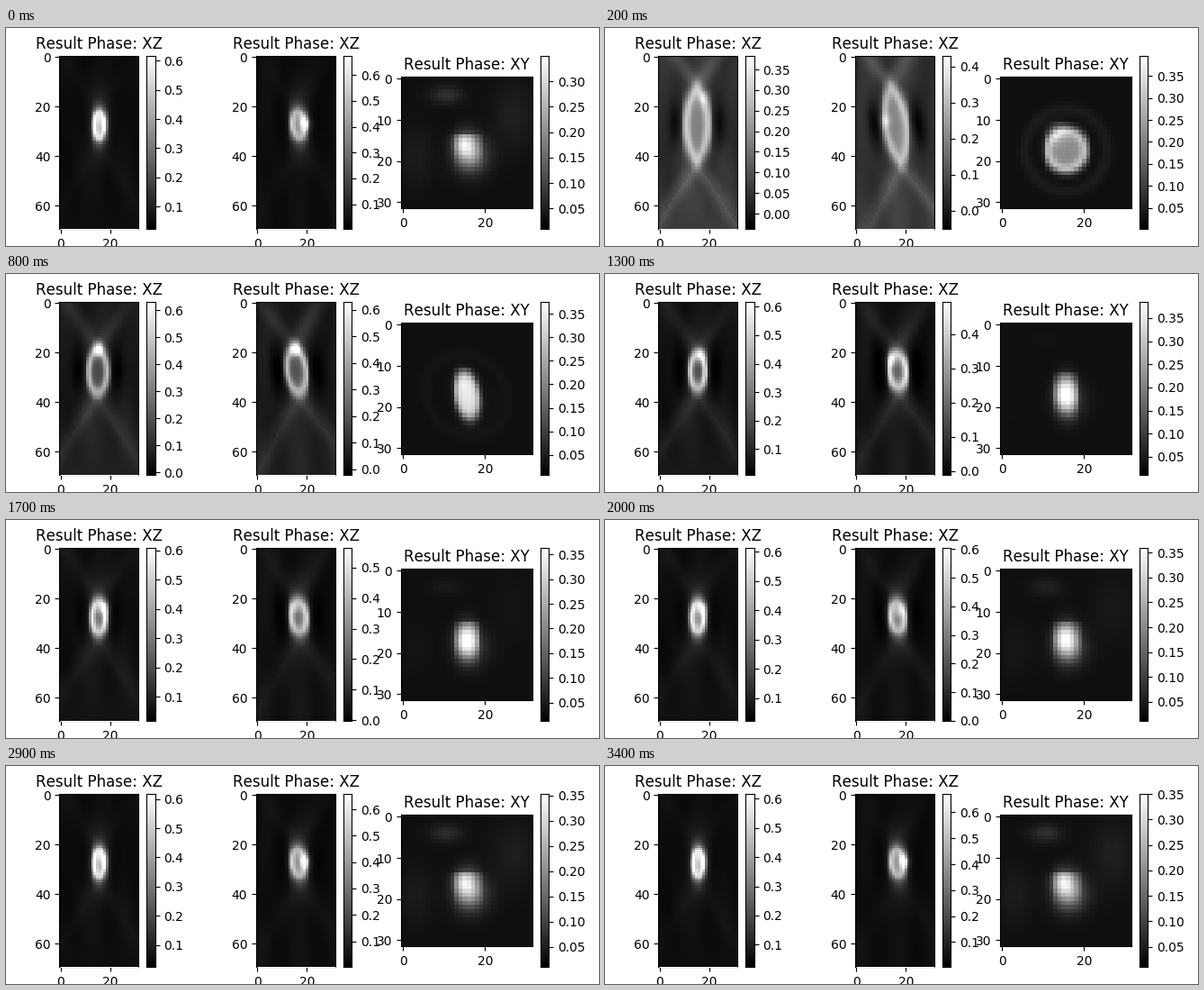
Animation of 659x242 px, one loop 3500 ms. Source, as a matplotlib script:

```python
import numpy as np
import matplotlib.pyplot as plt
from matplotlib.animation import FuncAnimation
from matplotlib.lines import Line2D

W, H, DPI = 659, 242, 100
FRAMES, INTERVAL = 35, 100

plt.rcParams.update({"font.family": "DejaVu Sans", "font.size": 10,
                     "text.kerning_factor": 6})

# Iterations at which the reconstruction is described; linear in between.
STEPS = [2, 8, 13, 17, 23, 34]

LEFT = dict(
    vmin=[-.038, -.010, .008, .017, .025, .022],
    vmax=[.383, .630, .617, .609, .618, .617],
    cx=[15.3, 15.2, 15.6, 15.6, 15.7, 15.8],
    cz=[27.5, 28, 27.8, 27.8, 27.8, 27.8],
    rx=[4.8, 3.9, 3.2, 3, 2.6, 2.5],
    rz=[15, 9, 7.6, 7.2, 6.8, 6.6],
    width=[.26, .32, .4, .44, .5, .52],
    fill=[.33, .2, .25, .4, .6, .65],
    wall=[.38, .5, .64, .6, .48, .43],
    sx=[18, 15.6, 17, 17.3, 17, 17],
    sz=[17, 18.6, 21, 24, 25, 26],
    spot=[.2, .55, .35, .3, .25, .15],
)
MID = dict(
    vmin=[-.051, -.022, -.012, -.004, 0, .003],
    vmax=[.430, .630, .4945, .565, .643, .671],
    cx=[16, 15.9, 16.7, 16.7, 16.6, 16.7],
    cz=[27.5, 27.5, 27.6, 27.6, 27.6, 27.6],
    rx=[4.8, 4, 3.6, 3.4, 3.1, 3],
    rz=[15.5, 9.3, 7.6, 7.3, 6.8, 6.6],
    width=[.26, .32, .4, .44, .5, .52],
    fill=[.32, .22, .3, .35, .45, .45],
    wall=[.34, .5, .62, .5, .4, .37],
    sx=[12, 15.5, 14.3, 15.5, 19, 19.2],
    sz=[26, 18.6, 23, 24, 27, 27],
    spot=[.22, .55, .25, .15, .35, .45],
    skew=[.13, .1, .06, .06, .06, .06],
)
SIDE = dict(
    bg=[.19, .1, .07, .06, .05, .05],
    cone=[.15, .1, .08, .05, .03, .02],
    power=[1.3, 2, 2, 2, 2, 2],
    shade=[.1, .25, .35, .35, .35, .35],
)
TOP = dict(
    vmin=[.001, .007, .010, .0125, .0095, .0095],
    vmax=[.396, .375, .385, .363, .356, .3502],
    cx=[15.6, 15.6, 15.7, 15.7, 15.8, 15.8],
    cz=[17.4, 17.2, 16.9, 16.8, 16.8, 16.8],
    rx=[4.8, 2.7, 2.5, 2.5, 2.7, 2.7],
    rz=[4.9, 5.3, 4.2, 4, 3.8, 3.6],
    width=[.28, .3, .3, .3, .3, .3],
    soft=[.08, .16, .28, .3, .35, .36],
    fill=[.48, .8, .85, .8, .58, .5],
    wall=[.36, .1, 0, 0, 0, 0],
    sx=[13.5, 14.6, 15.2, 15.2, 14.7, 14.6],
    sz=[13, 14, 17, 16.8, 15.6, 15.6],
    spot=[.2, .1, .12, .15, .28, .36],
    skew=[0, .12, .03, 0, 0, 0],
    edge=[11, 11, 11.7, 12.2, 13.2, 13.4],
    tail=[0, .04, .1, .14, .22, .26],
    ghost=[0, 0, .01, .04, .1, .13],
    halo=[.05, .02, 0, 0, 0, 0],
)


def state(track, n):
    """Values at iteration n, extended linearly past both ends."""
    out = {}
    for name, v in track.items():
        first = v[0] - (v[1] - v[0]) / (STEPS[1] - STEPS[0])
        last = v[-1] + (v[-1] - v[-2]) / (STEPS[-1] - STEPS[-2])
        out[name] = np.interp(n, [1, *STEPS, 35], [first, *v, last])
    return out


def bump(x, z, sx, sz):
    return np.exp(-(x / sx) ** 2 - (z / sz) ** 2)


def shell(x, z, k, soft=.08, power=2, margin=1):
    """Filled ellipse with a bright rim, cut off at the support's sides."""
    dz = z - k["cz"]
    dx = x - k["cx"] - k.get("skew", 0) * dz
    r = np.sqrt(np.abs(dx / k["rx"]) ** power + (dz / k["rz"]) ** 2)
    inside = 1 / (1 + np.exp(np.clip((r - 1) / soft, -40, 40)))
    rim = np.exp(-((r - 1) / k["width"]) ** 2)
    body = k["fill"] * inside + k["wall"] * rim
    body *= 1 - k.get("shade", 0) * np.clip(np.abs(dz) / k["rz"], 0, 1.3) ** 2
    body[np.abs(x - k["cx"]) > k["rx"] + margin] *= .3
    return body, dx, dz


def side_view(k, phase):
    z, x = np.mgrid[0:70, 0:32].astype(float)
    body, dx, dz = shell(x, z, k, power=k["power"])
    reach = np.abs(dz) - k["rz"]
    arm = np.abs(dx) - .65 * np.maximum(reach, 0)
    open_ = 1 / (1 + np.exp(-reach / 2))
    fade = np.exp(-np.maximum(reach, 0) / 40)
    cone = open_ * (np.exp(-(arm / 3.8) ** 2) * fade + .3 * (dz > 0) * (arm < 0))
    flank = bump(np.abs(dx) - k["rx"] - 4, dz, 3, 10)
    ripple = np.sin(.4 * x + phase + 1.2 * np.sin(.07 * z)) * np.cos(.06 * z + phase)
    img = k["bg"] + body + k["cone"] * (cone - 1.1 * flank)
    img += (.012 + .15 * k["cone"]) * ripple
    img += .15 * bump(dx, dz, 4, 13) * (1 - bump(dx, dz, k["rx"], k["rz"]))
    return img + k["spot"] * bump(x - k["sx"], z - k["sz"], 2, 2.6)


def top_view(k):
    z, x = np.mgrid[0:32, 0:32].astype(float)
    body, dx, dz = shell(x, z, k, soft=k["soft"], margin=.7)
    body += k["spot"] * bump(x - k["sx"], z - k["sz"], 2.4, 2.8)
    body[z < k["edge"]] *= .4
    img = .06 + body + k["tail"] * bump(x - 16.8, z - 18.8, 4.4, 4.4)
    img += k["halo"] * np.exp(-((np.hypot(dx, dz) - 10) / 1.5) ** 2)
    clouds = bump(x - 10.6, z - 4, 4, 2.2)
    clouds += .5 * bump(x - 27, z - 9, 5, 8) + .4 * bump(x - 3, z - 19, 4, 7)
    return img + k["ghost"] * clouds


def px_axes(x0, y0, x1, y1):
    return fig.add_axes([x0 / W, 1 - y1 / H, (x1 - x0) / W, (y1 - y0) / H])


def panel(box, shape, title, yticks):
    ax = px_axes(*box)
    im = ax.imshow(np.zeros(shape), cmap="gray", vmin=0, vmax=1,
                   aspect="auto", interpolation="nearest")
    ax.set_title(title)
    ax.set_xticks([0, 20])
    ax.set_yticks(yticks)
    return im


def colorbar(x):
    ax = px_axes(x, 31, x + 9.6, 223.4)
    ax.imshow(np.linspace(1, 0, 256)[:, None], cmap="gray", aspect="auto",
              extent=(0, 1, 0, 1), transform=ax.transAxes)
    ax.set_xticks([])
    ax.yaxis.tick_right()
    return ax


def set_range(ax, lo, hi):
    step, digits = (.05, 2) if hi - lo < .45 else (.1, 1)
    ticks = step * np.arange(np.ceil(lo / step), np.floor(hi / step) + 1) + 0.0
    ax.set_yticks(ticks, [f"{v:.{digits}f}" for v in ticks])
    ax.set_ylim(lo, hi)


fig = plt.figure(figsize=(W / DPI, H / DPI), dpi=DPI, facecolor="white")
rows = [0, 20, 40, 60]
views = [
    (panel((59.2, 31, 147.2, 223.4), (70, 32), "Result Phase: XZ", rows),
     colorbar(156), {**SIDE, **LEFT}, lambda k: side_view(k, .5)),
    (panel((278, 31, 366, 223.4), (70, 32), "Result Phase: XZ", rows),
     colorbar(374.75), {**SIDE, **MID}, lambda k: side_view(k, 2.2)),
    (panel((438.9, 54.2, 584.9, 200.2), (32, 32), "Result Phase: XY", [0, 10, 20, 30]),
     colorbar(593.5), TOP, top_view),
]

# Thin white gap under both side views.
for left in (60, 279):
    fig.add_artist(Line2D([left / W, (left + 87) / W], [1 - 222.5 / H] * 2,
                          color="white", lw=.72, solid_capstyle="butt"))


def update(i):
    n = i or FRAMES
    for im, bar, track, render in views:
        k = state(track, n)
        im.set_data(np.clip(render(k), 0, 1))
        set_range(bar, k["vmin"], k["vmax"])
    return []


anim = FuncAnimation(fig, update, frames=FRAMES, interval=INTERVAL,
                     init_func=lambda: update(0), repeat=True, repeat_delay=0)
plt.show()
```
